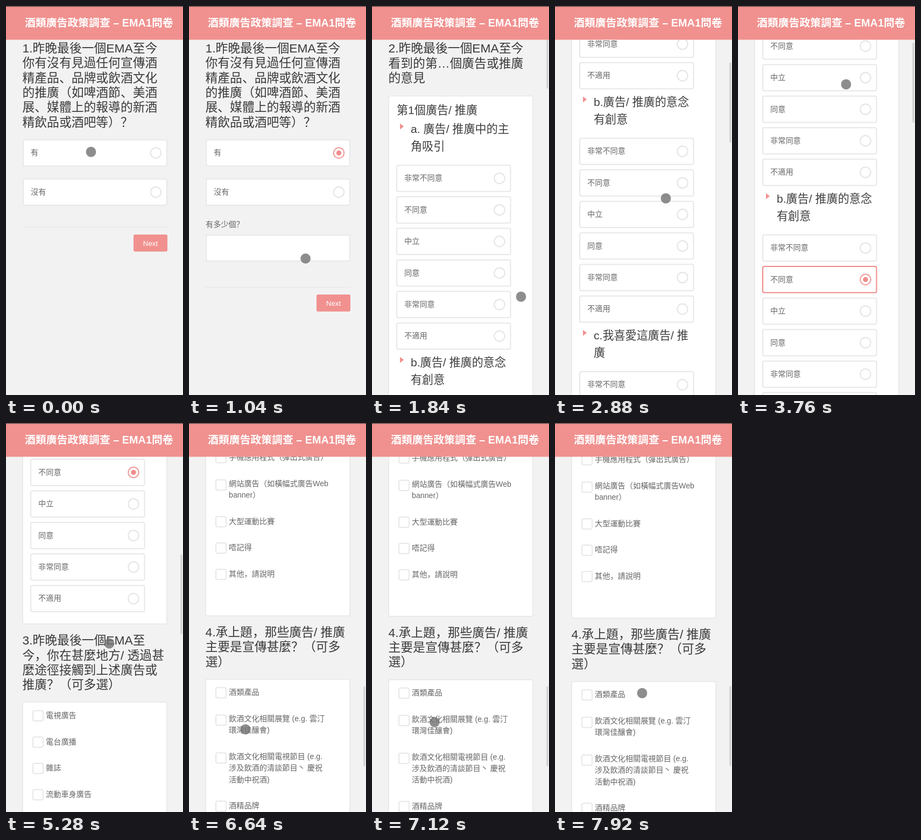
Write an HTML page that moves like this. It is 329 px wide and 720 px high and loops after 8000 ms.

```html
<!DOCTYPE html>
<html lang="zh-Hans">
<head>
<meta charset="utf-8">
<title>問卷</title>
<style>
  html, body { margin: 0; width: 100%; height: 100%; overflow: hidden; background: #f2f2f2; }
  svg { display: block; width: 100vw; height: 100vh; }
  text {
    font-family: "Liberation Sans", "Noto Sans CJK SC", "Noto Sans CJK TC", "Noto Sans CJK", sans-serif;
    font-weight: 300;
    white-space: pre;
  }
  .title { font-size: 19.85px; font-weight: bold; fill: #fff; }
  .question { font-size: 22.8px; fill: #3a3a3a; }
  .sub { font-size: 21.1px; fill: #3e3e3e; }
  .label { font-size: 14.2px; fill: #666; }
  .button { font-size: 13.4px; fill: #fff; text-anchor: middle; }
  .card { fill: #fff; stroke: #e6e6e6; stroke-width: 1.5; }
  .box { fill: #fff; stroke: #e8e8e8; stroke-width: 2; }
  .ring { fill: #fff; stroke: #e4e4e4; stroke-width: 2; }
  .dot { fill: none; }
  .on .ring { stroke: #f09a97; }
  .on .dot { fill: #ee8e8b; }
  .focus .box { stroke: #ec8a86; }
  .accent { fill: #f0918f; }
  .line { fill: #e6e6e6; }
  .thumb { fill: #d0d0d0; }
  .edge { fill: #584a4a; }
</style>
</head>
<body>
<svg id="stage" viewBox="0 0 329 720" preserveAspectRatio="none"></svg>
<script>
const NS = 'http://www.w3.org/2000/svg';
const LOOP = 8000, STEP = 80, DWELL = 160;
const stage = document.getElementById('stage');

function add(parent, tag, attrs = {}) {
  const el = document.createElementNS(NS, tag);
  for (const k in attrs) el.setAttribute(k, attrs[k]);
  parent.appendChild(el);
  return el;
}

const group = parent => add(parent, 'g');

const rect = (parent, cls, x, y, width, height, rx = 3) =>
  add(parent, 'rect', { class: cls, x, y, width, height, rx });

// Lines of text, the first one centred on y.
function write(parent, cls, x, y, lines, pitch = 0) {
  lines.split('|').forEach((line, i) => {
    const el = add(parent, 'text', { class: cls, x, y: y + i * pitch, dy: '0.37em' });
    el.textContent = line;
  });
}

const question = (parent, y, lines) => write(parent, 'question', 30.5, y, lines, 27.35);

function option(parent, x, y, width, label) {
  const g = group(parent);
  rect(g, 'box', x + 1, y - 24.3, width - 2, 48.6);
  write(g, 'label', x + 15, y - 0.8, label);
  const cx = x + width - 21.5;
  add(g, 'circle', { class: 'ring', cx, cy: y, r: 9.7 });
  add(g, 'circle', { class: 'dot', cx, cy: y, r: 4.7 });
  return g;
}

function checklist(parent, y, items) {
  for (const item of items) {
    const extra = item.split('|').length - 1;
    rect(parent, 'box', 50, y - (extra ? 6.5 : 8.5), 19, 19);
    write(parent, 'label', 74, y - 0.3, item, 21.3);
    y += 48.7 + 21.3 * extra;
  }
}

// First page
const intro = group(stage);
question(intro, 77.5, '1.昨晚最後一個EMA至今|你有沒有見過任何宣傳酒|精產品、品牌或飲酒文化|的推廣（如啤酒節、美酒|展、媒體上的報導的新酒|精飲品或酒吧等）？');
const yes = option(intro, 31, 272, 269, '有');
option(intro, 31, 344.5, 269, '沒有');

const count = group(intro);
write(count, 'label', 31, 404, '有多少個？');
rect(count, 'box', 32, 424, 267, 48);
const answer = group(count);
write(answer, 'label', 46, 448, '1');

const footer = group(intro);
rect(footer, 'line', 30, 409, 270, 1, 0);
rect(footer, 'accent', 237, 423, 63, 31.5);
write(footer, 'button', 268.5, 438.7, 'Next');

// Long scrolling page
const form = group(stage);
question(form, 78, '2.昨晚最後一個EMA至今|看到的第…個廣告或推廣|的意見');
rect(form, 'card', 31, 166.5, 268, 1355.5);
write(form, 'sub', 46, 192, '第1個廣告/ 推廣');

const SCALE = ['非常不同意', '不同意', '中立', '同意', '非常同意', '不適用'];
const [partA, partB, partC] = [
  'a. 廣告/ 推廣中的主|角吸引',
  'b.廣告/ 推廣的意念|有創意',
  'c.我喜愛這廣告/ 推|廣'
].map((head, i) => {
  const y = 227.5 + i * 432;
  add(form, 'path', { class: 'accent', d: `M52 ${y - 10}l7 5.5-7 5.5z` });
  write(form, 'sub', 72, y, head, 31.7);
  return SCALE.map((s, k) => option(form, 45, y + 91.5 + k * 58.4, 213.5, s))[1];
});

question(form, 1552, '3.昨晚最後一個EMA至|今，你在甚麼地方/ 透過甚|麼途徑接觸到上述廣告或|推廣？（可多選）');
rect(form, 'card', 31, 1666.5, 268, 1021.5);
checklist(form, 1691, [
  '電視廣告', '電台廣播', '雜誌', '流動車身廣告', '報紙', '海報', '宣傳單張',
  '公共交通工具（如巴士|站、車廂）', '超級市場', '便利店', '餐廳或酒吧', '推廣活動',
  '社交媒體', '電郵', '手機應用程式（彈出式廣告）', '網站廣告（如橫幅式廣告Web|banner）',
  '大型運動比賽', '唔記得', '其他，請說明'
]);

question(form, 2717.5, '4.承上題，那些廣告/ 推廣|主要是宣傳甚麼？（可多|選）');
rect(form, 'card', 31, 2805.5, 268, 560);
checklist(form, 2829.3, [
  '酒類產品', '飲酒文化相關展覽 (e.g. 雲汀|環灣佳釀會)',
  '飲酒文化相關電視節目 (e.g.|涉及飲酒的清談節目丶 慶祝|活動中祝酒)', '酒精品牌'
]);

// Fixed parts
const thumb = rect(stage, 'thumb', 324.3, 0, 3.2, 148, 1.6);
rect(stage, 'accent', 0, 0, 329, 62.5, 0);
rect(stage, 'edge', 0, 0, 329, 1.3, 0);
write(stage, 'title', 35, 31, '酒類廣告政策調查 – EMA1問卷');
const pointer = add(stage, 'circle', { r: 9.4, fill: '#707070', 'fill-opacity': 0.8 });

// Moments of the taps
const TAP = { yes: 160, next: 1840, b: 3120, a: 3920, c: 4960 };

// Stops of the hand: time, scroll, pointer x and y
const STOPS = [
  [0, 0, 158, 270], [640, 0, 200, 448], [1600, 0, 277, 538], [1840, 0, 277, 538],
  [2880, 482, 206, 356], [TAP.b, 482, 206, 334], [TAP.a, 270, 200, 110],
  [4480, 270, 197, 465], [TAP.c, 1000, 200, 242], [5280, 1150, 192, 408],
  [6640, 2331, 105, 567], [7920, 2327, 162, 500]
];

// Rest briefly at each stop, then glide to the next.
function pose(t) {
  const next = STOPS.findIndex(stop => stop[0] > t);
  if (next < 0) return STOPS[STOPS.length - 1];
  const a = STOPS[next - 1], b = STOPS[next];
  const p = Math.max(0, (t - a[0] - DWELL) / (b[0] - a[0] - DWELL));
  const ease = p * p * (3 - 2 * p);
  return a.map((v, i) => v + (b[i] - v) * ease);
}

const show = (el, on) => { el.style.display = on ? '' : 'none'; };

function choose(el, t, tap, blur) {
  el.classList.toggle('on', t >= tap);
  el.classList.toggle('focus', t >= tap && t < blur);
}

function draw(t) {
  const first = t < TAP.next;
  const opened = t >= TAP.yes + STEP;
  show(intro, first);
  show(form, !first);
  show(thumb, !first);
  show(count, opened);
  show(answer, t >= 1120);
  footer.setAttribute('transform', `translate(0 ${opened ? 111 : 0})`);

  choose(yes, t, TAP.yes, 960);
  choose(partB, t, TAP.b, TAP.a);
  choose(partA, t, TAP.a, TAP.c);
  choose(partC, t, TAP.c, TAP.c + DWELL);

  const [, scroll, x, y] = pose(t);
  form.setAttribute('transform', `translate(0 ${-scroll})`);
  thumb.setAttribute('y', 5 + 0.207 * scroll);
  pointer.setAttribute('cx', x);
  pointer.setAttribute('cy', y);
}

const start = performance.now();
function tick() {
  const t = (performance.now() - start) % LOOP;
  draw(Math.floor(t / STEP) * STEP);
  requestAnimationFrame(tick);
}
tick();
</script>
</body>
</html>
```
